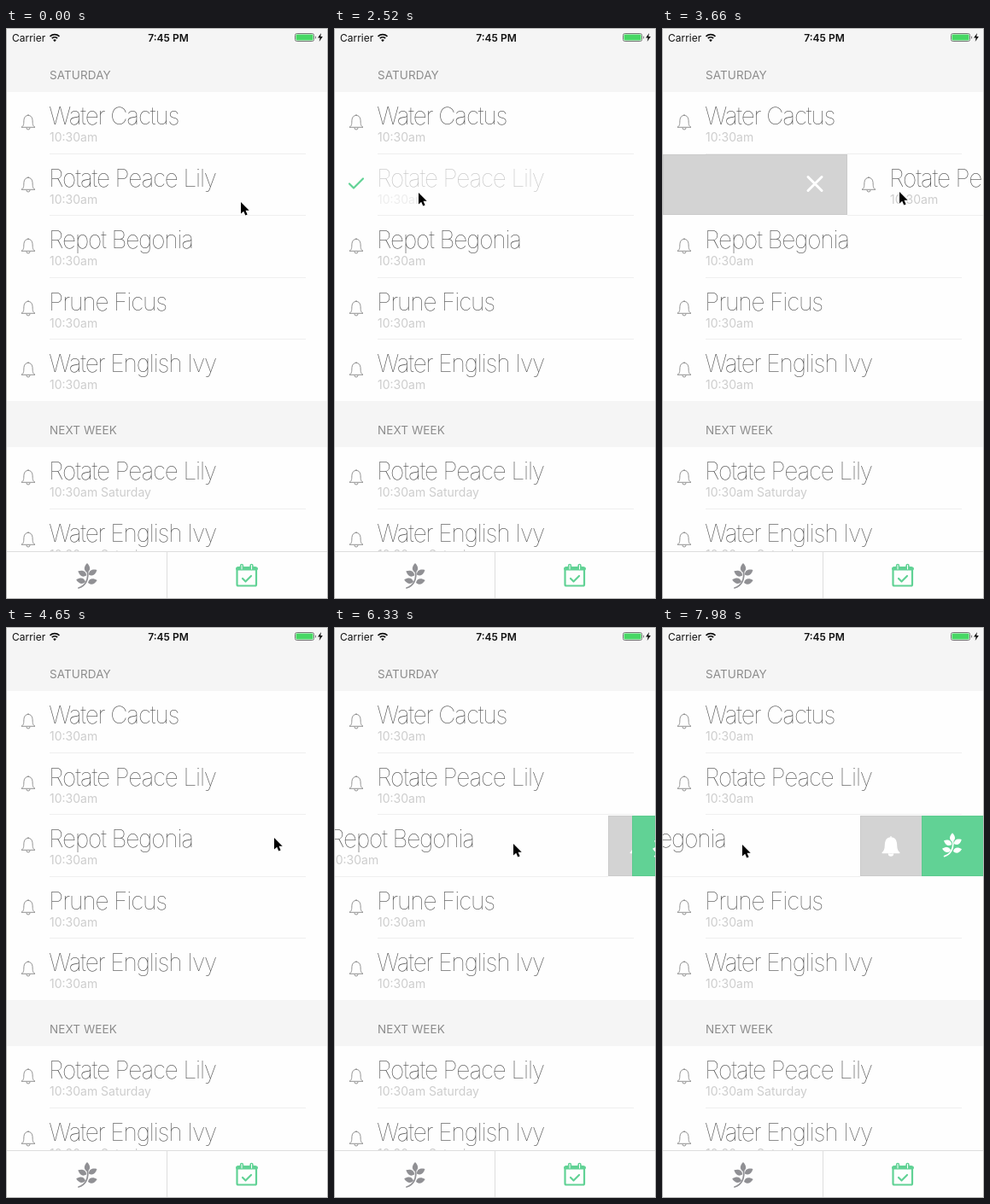
Recreate the animation shown at these times as an HTML page. Size 377 px wide and 669 px high, loop 8 s.

```html
<!DOCTYPE html>
<html lang="en">
<head>
<meta charset="utf-8">
<title>Plant care reminders</title>
<style>
  html, body { margin: 0; width: 100%; height: 100%; overflow: hidden; background: #fefefe; }
  svg { display: block; width: 377px; height: 669px; }
  text { font-family: Inter, Roboto, "Liberation Sans", sans-serif; }
  .title { font-size: 28px; font-weight: 100; letter-spacing: -1.15px; fill: #4a4a4a; }
  .time { font-size: 14px; fill: #cdcdcd; }
  .head { font-size: 13.5px; letter-spacing: .1px; fill: #8c8c8c; }
  .status { font-size: 12px; fill: #111; }
  .line { fill: none; stroke-linecap: round; stroke-linejoin: round; }
  .sep { stroke: #efefef; }
  .edge { fill: none; stroke: #000; stroke-opacity: .04; }
</style>
</head>
<body>
<svg viewBox="0 0 377 669">
  <defs>
    <path id="bell" d="M-8 6.3C-4.6 4.6-5.4 1-5-2.5C-4.6-6-2.6-7.6 0-7.6S4.6-6 5-2.5C5.4 1 4.6 4.6 8 6.3ZM0-7.6V-9M-2 7a2 2 0 0 0 4 0"/>
    <path id="tick" class="line" d="M-8 .5L-3 5.5L8-5.5"/>
    <path id="cross" class="line" d="M-8-8L8 8M8-8L-8 8"/>
    <g id="sprig">
      <path class="line" d="M-10 14C-3 12 3 5 0-8" stroke="currentColor" stroke-width="1.8"/>
      <g fill="currentColor">
        <path id="leaf" d="M0 0C-5-3-5-8 0-13C5-8 5-3 0 0Z" transform="translate(0 -4) scale(.85)"/>
        <use href="#leaf" transform="translate(0 0) rotate(-62) translate(0 3)"/>
        <use href="#leaf" transform="translate(1 -1) rotate(60) translate(0 3)"/>
        <use href="#leaf" transform="translate(-1 7) rotate(-78) translate(0 3)"/>
        <use href="#leaf" transform="translate(0 8) rotate(76) translate(0 3)"/>
      </g>
    </g>
  </defs>

  <rect width="377" height="669" fill="#fefefe"/>
  <rect width="377" height="75" fill="#f5f5f5"/>
  <rect y="437" width="377" height="54" fill="#f5f5f5"/>
  <text class="head" x="51" y="59.5">SATURDAY</text>
  <text class="head" x="51" y="475.5">NEXT WEEK</text>

  <text class="status" x="7" y="16">Carrier</text>
  <text class="status" x="190" y="16" text-anchor="middle" font-weight="600">7:45 PM</text>
  <path d="M51.5 9.8a8 8 0 0 1 11 0M53.8 12.2a4.7 4.7 0 0 1 6.4 0" fill="none" stroke="#111" stroke-width="1.7"/>
  <path d="M57 16.2l-1.9-2.1a2.8 2.8 0 0 1 3.8 0z" fill="#111"/>
  <rect x="338.5" y="6.5" width="22" height="9" rx="2" fill="#fff" stroke="#777"/>
  <rect x="339.5" y="7.5" width="20" height="7" rx="1" fill="#47d764"/>
  <path d="M362 9.3a2 2 0 0 1 0 3.6z" fill="#777"/>
  <path d="M369 6l-4 5.6h2.6l-.9 4.4l4.1-6h-2.6z" fill="#111"/>

  <g id="list"></g>

  <rect y="613" width="377" height="56" fill="#fefefe"/>
  <path d="M0 613.5H377M188.5 614V669" stroke="#dedede"/>
  <use href="#sprig" x="95" y="642" color="#909094"/>
  <g class="line" stroke="#61d295" stroke-width="2.2">
    <rect x="270.5" y="632" width="22.5" height="21.5" rx="1.5"/>
    <path d="M271 633.5H293" stroke-width="4"/>
    <path d="M276 630V633M287.5 630V633" stroke-width="4.4"/>
    <path d="M276 629.5V634M287.5 629.5V634" stroke="#fff" stroke-width="1"/>
    <path d="M277 645L280.5 648.5L287 642"/>
  </g>

  <path id="cursor" d="M0 0V13.6L3.2 10.7L5.3 15.5L7.6 14.5L5.5 9.8H9.7Z" stroke="#fff" stroke-linejoin="round" paint-order="stroke"/>
  <rect x=".5" y=".5" width="376" height="668" fill="none" stroke="#b4b4b4"/>
</svg>

<script>
const LOOP = 8000, GREEN = '#61d295', GREY = '#d3d3d3';
const list = document.getElementById('list');
const cursor = document.getElementById('cursor');
const $ = (root, sel) => root.querySelector(sel);

const easings = {
  in: p => p * p,
  out: p => 1 - (1 - p) ** 2,
  soft: p => p * p * (3 - 2 * p)
};

// Each step is [time, values, easing used to arrive there].
function at(track, t) {
  const i = track.findIndex(s => s[0] > t);
  if (i < 0) return track[track.length - 1][1];
  if (i === 0) return track[0][1];
  const [t0, a] = track[i - 1], [t1, b, ease = 'soft'] = track[i];
  const p = easings[ease]((t - t0) / (t1 - t0));
  return a.map((v, k) => v + (b[k] - v) * p);
}

const pointer = [
  [660, [275, 204]], [1140, [107, 196]],
  [1320, [107, 196]], [1480, [311, 195.5], 'in'], [1850, [324, 195], 'out'],
  [1990, [324, 195]], [2520, [99, 193], 'in'], [2760, [68, 193], 'out'],
  [2910, [68, 193]], [3660, [278, 192]],
  [4070, [278, 192]], [4800, [318, 254]],
  [4920, [318, 254]], [5420, [146, 252.5]], [5590, [134, 253], 'out'],
  [5890, [134, 253]], [6650, [256, 254]],
  [6710, [256, 254]], [6820, [254, 253.5]],
  [7000, [254, 253.5]], [7420, [321, 254]],
  [7600, [321, 254]], [7980, [94, 255], 'out']
];
const lilyShift = [
  [1320, [0]], [1480, [94], 'in'], [1850, [215], 'out'],
  [1990, [215]], [2400, [0], 'out'],
  [2910, [0]], [3660, [216]],
  [4070, [216]], [4480, [0], 'out']
];
const begoniaShift = [
  [4920, [0]], [5420, [-140]], [5590, [-144], 'out'],
  [5890, [-144]], [6650, [-1]],
  [6710, [-1]], [6820, [0]],
  [7600, [0]], [7980, [-144], 'out']
];
const lilyDone = [[1510, [0]], [1710, [1]], [3270, [1]], [3470, [0]]];

// The rule between two rows belongs to the lower one.
function addRow(top, title, time, first) {
  const g = document.createElementNS('http://www.w3.org/2000/svg', 'g');
  g.setAttribute('transform', `translate(0 ${Math.ceil(top)})`);
  g.innerHTML = `
    <g class="under"></g>
    <g class="body">
      <rect x="1" width="375" height="72" fill="#fefefe"/>
      <use class="bell" href="#bell" x="26" y="35" fill="none" stroke="#919191"/>
      <g class="words">
        <text class="title" x="50.3" y="38">${title}</text>
        <text class="time" x="51" y="58">${time}</text>
      </g>
    </g>
    ${first ? '' : '<path class="sep" d="M51-.5H351"/>'}`;
  list.append(g);
  return g;
}

const PITCH = 72.4;
const rows = ['Water Cactus', 'Rotate Peace Lily', 'Repot Begonia', 'Prune Ficus', 'Water English Ivy']
  .map((name, i) => addRow(75 + i * PITCH, name, '10:30am', i === 0));
['Rotate Peace Lily', 'Water English Ivy']
  .forEach((name, i) => addRow(491 + i * PITCH, name, '10:30am Saturday', i === 0));
const [, lily, begonia] = rows;

$(lily, '.under').innerHTML = `
  <rect class="fill" x="1" width="0" height="71"/>
  <rect class="edge" x="1.5" y=".5" width="0" height="70"/>
  <g class="mark" stroke="#fff">
    <use class="yes" href="#tick" transform="scale(1.4)" stroke-width="2.2"/>
    <use class="no" href="#cross" stroke-width="3"/>
  </g>`;
$(lily, '.body').insertAdjacentHTML('beforeend',
  `<use class="done" href="#tick" x="26" y="34" stroke="${GREEN}" stroke-width="2.2"/>`);

const button = (name, fill, icon) => `
  <g class="${name}">
    <rect y="1" width="146" height="71" fill="${fill}"/>
    <rect class="edge" x=".5" y="1.5" width="146" height="70"/>
    ${icon}
  </g>`;
$(begonia, '.under').innerHTML =
  button('remind', GREY, '<use href="#bell" transform="translate(36 36.5) scale(1.28)" fill="#fff" stroke="#fff"/>') +
  button('plant', GREEN, '<use href="#sprig" transform="translate(36 35.5) scale(.94)" color="#fff"/>');

function shiftRow(row, x) {
  $(row, '.body').setAttribute('transform', `translate(${x} 0)`);
  $(row, '.under').style.display = x ? '' : 'none';
  const from = x > 0 ? x + 1 : x ? 1 : 51;
  const to = x < 0 ? 376 + x : x ? 376 : 351;
  $(row.nextElementSibling, '.sep').setAttribute('d', `M${from}-.5H${to}`);
}

function draw(t) {
  const [cx, cy] = at(pointer, t);
  cursor.setAttribute('transform', `translate(${Math.round(cx)} ${Math.round(cy)})`);

  const right = Math.round(at(lilyShift, t)[0]);
  const undo = t > 2800;
  shiftRow(lily, right);
  $(lily, '.fill').setAttribute('width', right);
  $(lily, '.fill').setAttribute('fill', undo ? GREY : GREEN);
  $(lily, '.under .edge').setAttribute('width', Math.max(0, right - 1));
  $(lily, '.mark').setAttribute('transform', `translate(${right - 37} 34.5)`);
  $(lily, '.yes').style.display = undo ? 'none' : '';
  $(lily, '.no').style.display = undo ? '' : 'none';

  const done = at(lilyDone, t)[0];
  $(lily, '.bell').style.opacity = 1 - done;
  $(lily, '.done').style.opacity = done;
  $(lily, '.words').style.opacity = 1 - .67 * done;

  const left = Math.round(at(begoniaShift, t)[0]);
  shiftRow(begonia, left);
  $(begonia, '.remind').setAttribute('transform', `translate(${376 + left} 0)`);
  $(begonia, '.plant').setAttribute('transform', `translate(${Math.round(376 + left / 2)} 0)`);
}

const start = performance.now();
function tick() {
  draw((performance.now() - start) % LOOP);
  requestAnimationFrame(tick);
}
tick();
</script>
</body>
</html>
```
